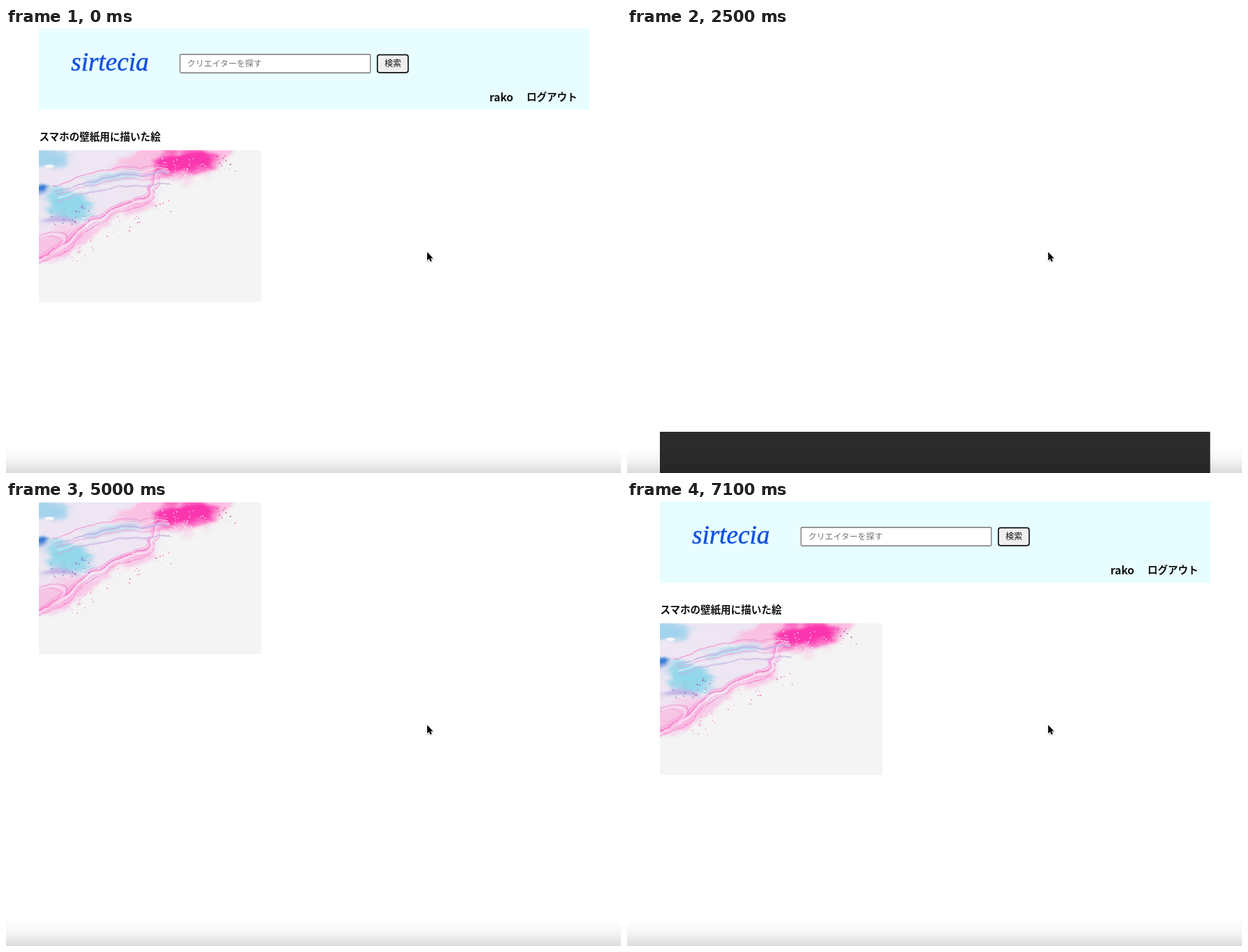
Recreate the animation shown at these times as an HTML page. Size 879 by 637 pixels, loop 7200 ms.

```html
<!DOCTYPE html>
<html lang="ja">
<head>
<meta charset="utf-8">
<title>Page scroll</title>
<style>
  html, body { margin: 0; width: 100%; height: 100%; overflow: hidden; background: #fff; }
  svg { display: block; width: 879px; height: 637px; }
  text { font-family: "Noto Sans CJK JP", "Noto Sans CJK", "Noto Sans", sans-serif; fill: #111; }
  .logo { font-family: "Liberation Serif", serif; font-style: italic; }
  .bold { font-weight: 700; }
</style>
</head>
<body>
<svg viewBox="0 0 879 637">
  <defs>
    <linearGradient id="shade" x2="0" y2="1">
      <stop offset="0" stop-opacity="0"/>
      <stop offset=".5" stop-opacity=".04"/>
      <stop offset="1" stop-opacity=".14"/>
    </linearGradient>
    <filter id="marble" filterUnits="userSpaceOnUse" x="-20" y="-20" width="350" height="240" color-interpolation-filters="sRGB">
      <feGaussianBlur in="SourceGraphic" stdDeviation="3.5" result="paint"/>
      <feTurbulence type="fractalNoise" baseFrequency=".02 .04" numOctaves="3" seed="4"/>
      <feDisplacementMap in="paint" scale="30" xChannelSelector="R" yChannelSelector="G"/>
    </filter>
    <filter id="vein" filterUnits="userSpaceOnUse" x="-20" y="-20" width="350" height="240" color-interpolation-filters="sRGB">
      <feGaussianBlur in="SourceGraphic" stdDeviation=".7" result="paint"/>
      <feTurbulence type="fractalNoise" baseFrequency=".03" numOctaves="2" seed="9"/>
      <feDisplacementMap in="paint" scale="14" xChannelSelector="R" yChannelSelector="G"/>
    </filter>
    <clipPath id="frame"><path d="M0 0H318V217H0Z"/></clipPath>
  </defs>

  <g id="page">
    <path d="M47 1H833.5V117H47Z" fill="#e7fdff"/>
    <text class="logo" x="93" y="60.5" font-size="37" style="fill:#1450e0;stroke:#1450e0;stroke-width:.5">sirtecia</text>
    <rect x="248.75" y="37.75" width="272" height="26.5" rx="1.5" fill="#fff" stroke="#777" stroke-width="1.3"/>
    <text x="259" y="55" font-size="11.9" style="fill:#757575">クリエイターを探す</text>
    <rect x="530.8" y="38.3" width="44" height="25.5" rx="3" fill="#efefef" stroke="#111" stroke-width="1.7"/>
    <text x="541" y="55.3" font-size="12">検索</text>
    <text class="bold" x="691" y="104.5" font-size="15.5">rako</text>
    <text class="bold" x="744" y="104.3" font-size="14.5">ログアウト</text>
    <text class="bold" x="47.5" y="160.5" font-size="14.5">スマホの壁紙用に描いた絵</text>

    <g transform="translate(47 175)" clip-path="url(#frame)">
      <path d="M0 0H318V217H0Z" fill="#f4f4f4"/>
      <g filter="url(#marble)">
        <path d="M-20 -20H140L180 45L160 72L70 115L30 158L-20 165Z" fill="#eee6f2"/>
        <path d="M100 22L150 -10H275L245 36L170 46Z" fill="#f9c0e2"/>
        <path d="M-10 125L70 112L165 58L160 78L90 108L30 155L-10 162Z" fill="#f8c4e5"/>
        <ellipse cx="212" cy="18" rx="42" ry="17" fill="#fb35ae"/>
        <ellipse cx="14" cy="12" rx="28" ry="13" fill="#a3d3ed"/>
        <ellipse cx="42" cy="78" rx="34" ry="20" fill="#93d7ea"/>
        <ellipse cx="30" cy="104" rx="28" ry="7" fill="#bfb2e2"/>
        <ellipse cx="105" cy="38" rx="42" ry="5" fill="#abd9ec" transform="rotate(-7 105 38)"/>
        <ellipse cx="0" cy="59" rx="9" ry="9" fill="#2f78d4"/>
      </g>
      <g id="veins" filter="url(#vein)" fill="none"></g>
      <ellipse cx="15" cy="23" rx="7" ry="2.5" fill="#f6f6fc"/>
      <g id="specks"></g>
    </g>

    <path d="M47 1632H833.5V1769.500H47Z" fill="#2b2b2b"/>
    <text class="logo" x="441" y="1747.500" font-size="46.5" text-anchor="middle" style="fill:#fff;stroke:#fff;stroke-width:1">sirtecia</text>
  </g>

  <path d="M0 600H879V637H0Z" fill="url(#shade)"/>
  <path transform="translate(602 320.8)" d="M0 0V12L2.700 9.500L4.600 13.500L6.600 12.600L4.900 8.700H8.400Z"
        stroke="#fff" stroke-width="1.2" paint-order="stroke" style="filter:drop-shadow(0 1px 1px rgba(0,0,0,.3))"/>
</svg>
<script>
  const LOOP = 7200, TICK = 100;
  const byId = id => document.getElementById(id);
  const page = byId('page');

  const speedUp = u => u ** 4;
  const slowDown = u => 1 - (1 - u) ** 3;
  const swing = u => (1 - Math.cos(Math.PI * u)) / 2;

  // Each swipe eases from the previous offset to its own
  const swipes = [
    { from: 0, to: 2000, offset: 410, ease: speedUp },
    { from: 2000, to: 3000, offset: 1146, ease: slowDown },
    { from: 3000, to: 3600, offset: 1139, ease: swing },
    { from: 3700, to: 4500, offset: 347, ease: swing },
    { from: 4500, to: 5500, offset: -0.8, ease: swing },
    { from: 5800, to: 7100, offset: 0, ease: swing }
  ];

  function offsetAt(t) {
    let y = 0;
    for (const { from, to, offset, ease } of swipes) {
      const u = Math.min(Math.max((t - from) / (to - from), 0), 1);
      y += (offset - y) * ease(u);
    }
    return y;
  }

  let seed = 11;
  const random = () => (seed = seed * 16807 % 2147483647) / 2147483647;
  const pick = list => list[Math.floor(random() * list.length)];

  // Parallel strands of one curve, each shifted a little further
  function strands(path, count, dx, dy, colors) {
    let out = '';
    for (let i = 0; i < count; i++) {
      out += `<path d="${path}" transform="translate(${i * dx} ${i * dy})" stroke="${colors[i % colors.length]}"
        stroke-width="${1 + random() * 1.8}" opacity="${.5 + random() * .4}"/>`;
    }
    return out;
  }

  // Paint droplets scattered along a line
  function scatter(count, x0, y0, x1, y1, spread, colors) {
    let out = '';
    for (let i = 0; i < count; i++) {
      const k = random(), r = .35 + random() * .55;
      const x = x0 + (x1 - x0) * k + (random() - .5) * spread;
      const y = y0 + (y1 - y0) * k + (random() - .5) * spread;
      out += `<ellipse cx="${x}" cy="${y}" rx="${r * 1.3}" ry="${r}" fill="${pick(colors)}"/>`;
    }
    return out;
  }

  byId('veins').innerHTML =
    strands('M195 34C155 32 185 48 163 58C178 78 110 84 75 112S25 160 -10 163', 5, -2.5, -2, ['#f765c2', '#f99ad7', '#fbe3f3']) +
    strands('M20 50C70 30 110 24 185 22', 6, 1, 5, ['#f78fd0', '#f4eef7', '#c6b2e4']) +
    strands('M-5 120C35 112 60 122 10 152', 3, -3, 3, ['#f48bcd', '#fbe3f3']);

  byId('specks').innerHTML =
    scatter(40, 165, 16, 240, 30, 30, ['#fff', '#fde4f4']) +
    scatter(24, 65, 108, 165, 62, 24, ['#fff', '#fbd3ee']) +
    scatter(24, 12, 100, 75, 88, 26, ['#a04fae', '#f23da9', '#6b83cc']) +
    scatter(20, 90, 118, 190, 76, 22, ['#f23da9', '#c25aa8']) +
    scatter(14, 245, 8, 280, 24, 24, ['#f23da9', '#b3478d']) +
    scatter(40, 45, 152, 80, 130, 30, ['#f9b5df', '#f78ccd']);

  let start;
  function draw(now) {
    start ??= now;
    const t = Math.floor((now - start) % LOOP / TICK) * TICK;
    page.setAttribute('transform', `translate(0 ${-offsetAt(t)})`);
    requestAnimationFrame(draw);
  }
  requestAnimationFrame(draw);
</script>
</body>
</html>
```
